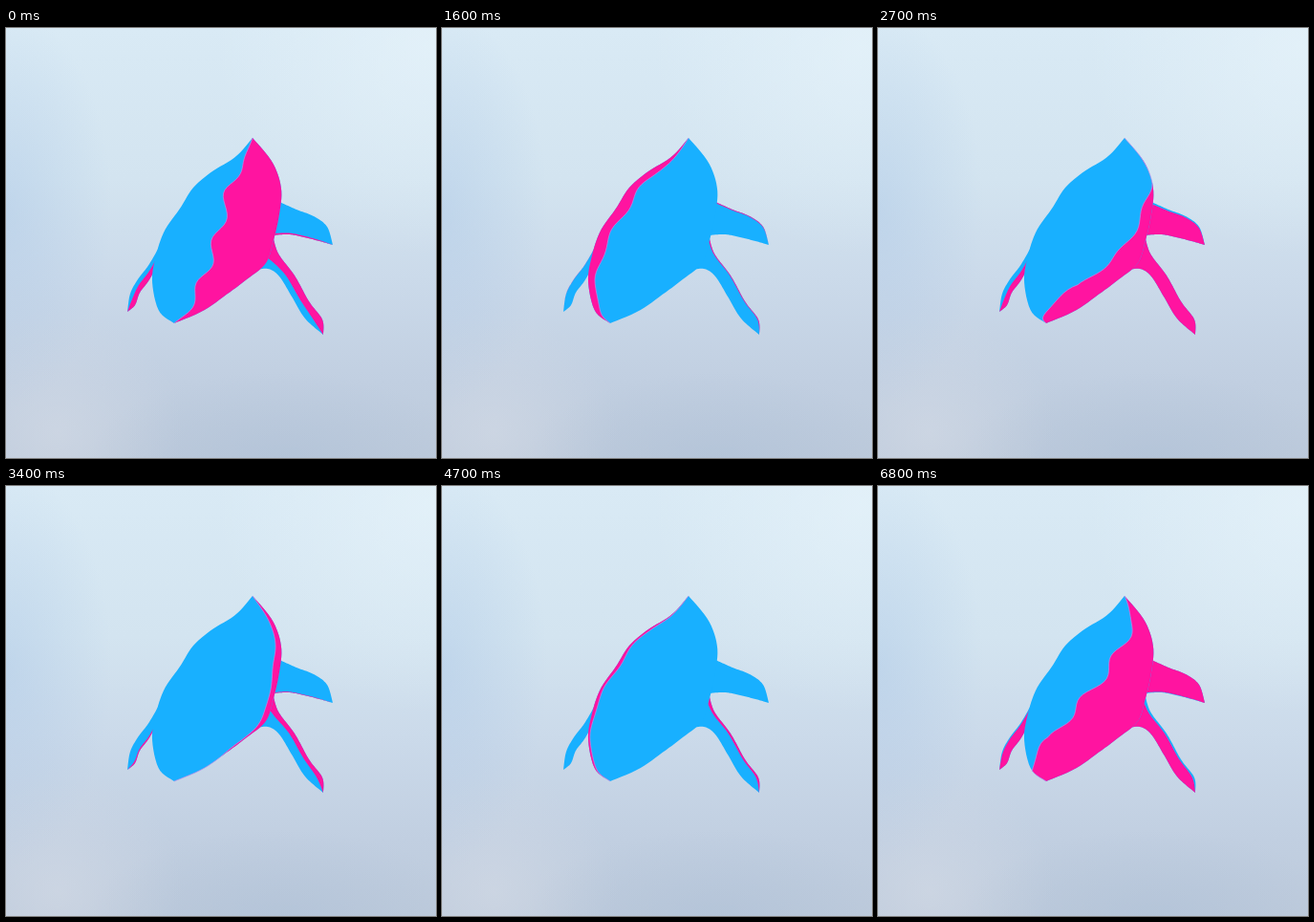
Write an HTML page with a canvas that moves like this. It is 450 by 450 pixels and loops after 6900 ms.

```html
<!DOCTYPE html>
<html lang="en">
<head>
<meta charset="utf-8">
<title>Whale in turning light</title>
<style>
html, body { margin: 0; width: 100%; height: 100%; overflow: hidden; }
body {
  background:
    radial-gradient(ellipse 110px 210px at 0 42%, rgba(168,197,230,.42), transparent),
    radial-gradient(circle at 98% 4%, rgba(230,243,250,.7), transparent 220px),
    radial-gradient(ellipse 200px 90px at 64% 100%, rgba(172,191,214,.5), transparent),
    radial-gradient(circle at 12% 94%, rgba(212,219,230,.6), transparent 130px),
    linear-gradient(#d9eaf5, #d3e4f0 35%, #cbdaea 58%, #c1cfe1 82%, #bdcadb);
}
canvas { display: block; width: 100vw; height: 100vh; }
</style>
</head>
<body>
<canvas width="450" height="450"></canvas>
<script>
const ctx = document.querySelector('canvas').getContext('2d');
const LOOP = 6900, STEP = 100, SAMPLES = 60;
const BLUE = '#18b0ff', PINK = '#ff14a0', SEAM = 'rgba(185,140,235,.7)';

const mix = (a, b, k) => a + (b - a) * k;
const clamp = v => Math.min(1, Math.max(0, v));

// Smooth curve through a few points, sampled evenly.
function curve(text) {
  const pts = text.split(' ').map(p => p.split(',').map(Number));
  const at = i => pts[Math.min(pts.length - 1, Math.max(0, i))];
  return Array.from({ length: SAMPLES + 1 }, (_, n) => {
    const x = n / SAMPLES * (pts.length - 1);
    const i = Math.min(pts.length - 2, Math.floor(x)), k = x - i;
    return [0, 1].map(d => {
      const [a, b, c, e] = [-1, 0, 1, 2].map(j => at(i + j)[d]);
      return b + k / 2 * (c - a + k * (2 * a - 5 * b + 4 * c - e + k * (3 * (b - c) + e - a)));
    });
  });
}

// Each part lies between two edges; lag and swing shift its share of the light.
const fin = {
  a: curve('284,181 304,190 322,197 336,208 342,227'),
  b: curve('279,217 296,216 312,219 328,223 342,227'),
  lag: .05, swing: .47
};
const rightTail = {
  a: curve('258,254 274,252 286,260 299,281 313,304 332,321'),
  b: curve('279,216 285,236 302,259 317,286 331,305 332,321'),
  lag: .18, swing: .35
};
const leftTail = {
  a: curve('163,224 150,247 138,263 130,278 127,297'),
  b: curve('157,251 149,265 140,277 135,290 127,297'),
  lag: .07, swing: .12
};
const body = {
  a: curve('258,115 240,135 216,150 196,167 182,189 166,212 157,238 153,265 160,296 176,309'),
  b: curve('258,115 279,141 288,168 286,195 280,222 272,246 252,263 232,278 206,296 176,309'),
  lag: 0, swing: 0, ridge: true
};
const parts = [fin, rightTail, leftTail, body];

// Time in ms, turns of the light, tilt of its axis.
const light = [
  [0, .26, -.5], [1600, 1.895, 0], [2700, 3.14, .5], [3400, 4.07, -.15],
  [4700, 5.945, 0], [5700, 7.26, .5], [6400, 8.26, .5]
];

function lightAt(t) {
  const i = Math.max(1, light.findIndex(key => key[0] >= t));
  if (t > light.at(-1)[0]) return light.at(-1).slice(1);
  const a = light[i - 1], b = light[i];
  const k = (t - a[0]) / (b[0] - a[0]);
  return [mix(a[1], b[1], k), mix(a[2], b[2], k)];
}

// Bends the shadow line along the body: tilt, belly and a bony ridge.
function bend(s, tilt, sweep) {
  const belly = 4 * Math.max(0, s - .75) * Math.max(0, tilt);
  const ridge = .05 * Math.cos((s - .42) * 28) * sweep;
  return tilt * (.5 - s) - belly + ridge;
}

function trace(points) {
  ctx.beginPath();
  points.forEach(p => ctx.lineTo(...p));
}

function fill(lo, hi, colour) {
  trace([...lo, ...[...hi].reverse()]);
  ctx.fillStyle = colour;
  ctx.fill();
}

function drawPart({ a, b, lag, swing, ridge }, turns, tilt) {
  const phase = ((turns + lag + swing * tilt) % 1 + 1) % 1;
  const waxing = phase < .5;
  const cos = Math.cos(phase * 2 * Math.PI);
  const across = .5 + (waxing ? cos : -cos) / 2;
  const sweep = 1 - cos * cos;
  const edge = a.map(([x, y], n) => {
    const u = clamp(across + (ridge ? bend(n / SAMPLES, tilt, sweep) : 0));
    return [mix(x, b[n][0], u), mix(y, b[n][1], u)];
  });
  fill(a, b, BLUE);
  fill(edge, waxing ? b : a, PINK);
  if (ridge) {
    trace(edge);
    ctx.strokeStyle = SEAM;
    ctx.stroke();
  }
}

function draw(t) {
  const [turns, tilt] = lightAt(t);
  ctx.clearRect(0, 0, 450, 450);
  for (const part of parts) drawPart(part, turns, tilt);
}

const start = performance.now();
function tick() {
  const t = (performance.now() - start) % LOOP;
  draw(Math.floor(t / STEP) * STEP);
  requestAnimationFrame(tick);
}
tick();
</script>
</body>
</html>
```
